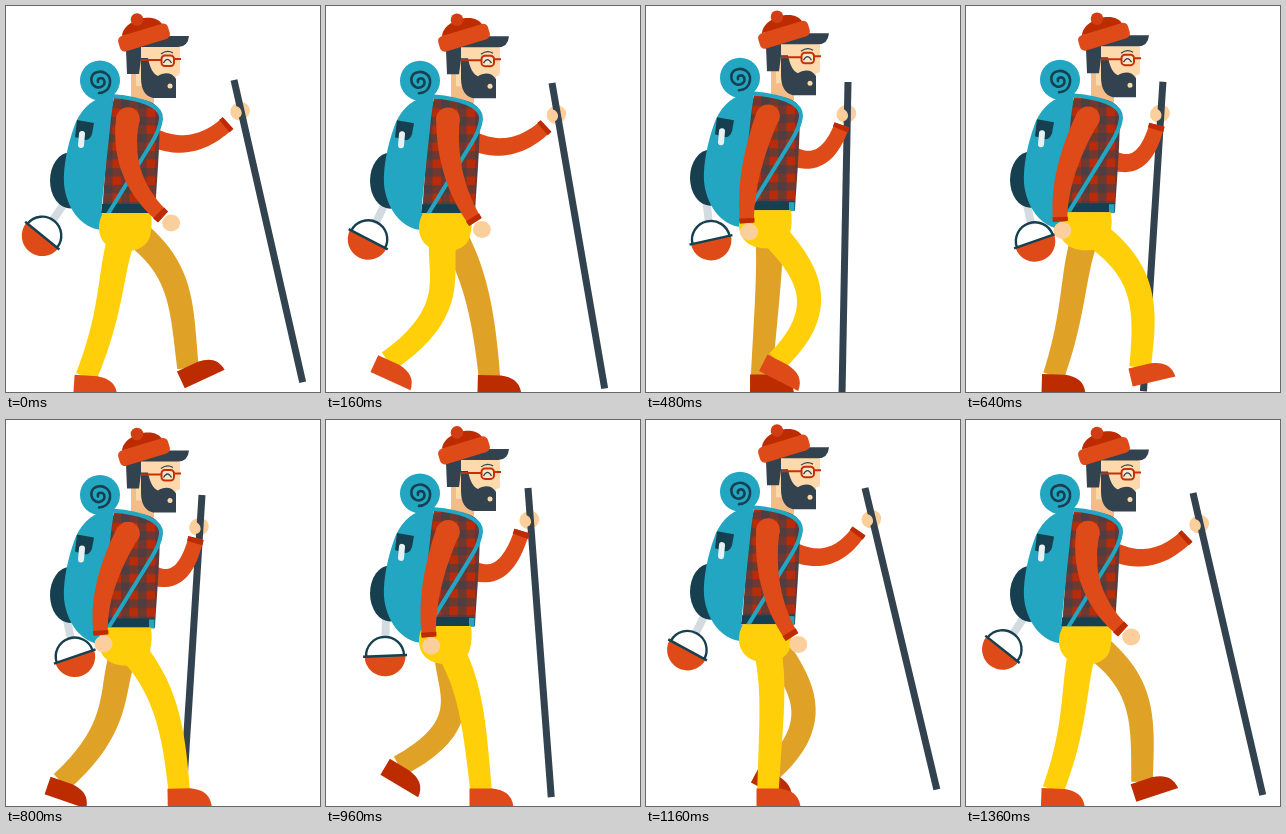
An HTML page that plays this animation: 314 px wide and 386 px high, repeating every 1400 ms.

```html
<!DOCTYPE html>
<html lang="en">
<head>
<meta charset="utf-8">
<title>Walking hiker</title>
<style>
html, body { margin: 0; width: 100%; height: 100%; overflow: hidden; background: #fff; }
svg { display: block; width: 100vw; height: 100vh; }
</style>
</head>
<body>
<svg viewBox="0 0 314 386" fill="none">
  <defs>
    <pattern id="plaid" x="98" y="94" width="17" height="17" patternUnits="userSpaceOnUse">
      <rect width="17" height="17" fill="#b92c0a"/>
      <path d="M0 0H8.500V17H0ZM0 0H17V8.500H0Z" fill="#33424f" fill-opacity=".0"/>
      <rect width="8.500" height="17" fill="#33424f" fill-opacity=".55"/>
      <rect width="17" height="8.500" fill="#33424f" fill-opacity=".55"/>
    </pattern>
  </defs>

  <ellipse id="palm" rx="10" ry="9" fill="#fbcf9b"/>
  <path id="pole" d="M0 0V310" stroke="#33424f" stroke-width="7"/>
  <ellipse id="fingers" rx="5" ry="6" fill="#fbcf9b"/>
  <path id="farArm" fill="#de4b19"/>
  <path id="farCuff" fill="#bd2b00"/>

  <path id="farLeg" fill="#e0a226"/>
  <path id="farShoe" class="shoe" fill="#bd2b00"/>

  <g class="bob">
    <path id="tether" d="M0 0V25" stroke="#d3dbe0" stroke-width="8"/>
    <g id="pot">
      <path d="M-20.500 0H20.500A20.500 20.500 0 0 1-20.500 0Z" fill="#de4b19"/>
      <path d="M-22 0H22M-19 0A19 19 0 0 1 19 0" stroke="#16404f" stroke-width="2.400"/>
    </g>
    <ellipse cx="64" cy="174.500" rx="20" ry="28" fill="#16404f"/>
    <path d="M125 66H148V97H125Z" fill="#f5bc88"/>
    <path d="M108 92C125 92 146 92 152 102C156 112 152 160 149 207H96L103 112Z" fill="url(#plaid)"/>
    <path d="M96 198H149V207H95Z" fill="#16404f"/>
    <path d="M143 199H148.500V208H143Z" fill="#23a6c1"/>
    <path d="M108 90L98 91C84 94 73 106 68 121C62 138 57 160 58 178C60 200 74 223 97 224L104 211L95 207L105 112Z" fill="#23a6c1"/>
    <circle cx="94" cy="74.500" r="20" fill="#23a6c1"/>
    <path d="M92 76C91 72 96 71 98 74C100 79 95 83 90 81C84 78 84 70 89 67C97 63 105 69 104 77C103 84 98 87 93 87" stroke="#16404f" stroke-width="2.600" stroke-linecap="round"/>
    <path d="M71 114L88 117L86 128Q84 134 79 134L69 131Z" fill="#16404f"/>
    <path d="M76 128L75 139" stroke="#e8f0f3" stroke-width="6" stroke-linecap="round"/>
    <path d="M106 90C130 92 156 98 155 113C154 122 150 130 145 138L102 208" stroke="#23a6c1" stroke-width="4"/>
  </g>

  <path id="nearLeg" fill="#ffd00a"/>
  <path id="nearShoe" class="shoe" fill="#de4b19"/>
  <path class="bob" d="M97 207H145C146 215 146 222 144 230C142 240 130 246 119 245C104 245 93 236 93 222C93 215 95 211 97 207Z" fill="#ffd00a"/>

  <ellipse id="nearHand" rx="9" ry="8.500" fill="#fbcf9b"/>
  <circle class="bob" cx="122" cy="113" r="11.800" fill="#de4b19"/>
  <path id="nearArm" fill="#de4b19"/>
  <path id="nearCuff" fill="#bd2b00"/>

  <g class="bob">
    <path d="M130 38H174V67Q174 70 170 70V80H130Z" fill="#fdd9ac"/>
    <path d="M120 44L160 30H183Q182 41 172 41H135V53L133 68H121Z" fill="#33424f"/>
    <path d="M135 52H142C144 62 147 68 152 70C158 66 166 66 170 73V92H147Q135 89 135 72Z" fill="#33424f"/>
    <circle cx="164" cy="80" r="2.500" fill="#fdd9ac"/>
    <path d="M155 48Q161 43.500 167 47" stroke="#33424f" stroke-width="1.200"/>
    <path d="M135 54H155M168 53H175" stroke="#c5300a" stroke-width="2"/>
    <rect x="155.500" y="49.500" width="12.500" height="10.500" rx="3.500" fill="#fde6c8" stroke="#c5300a" stroke-width="2"/>
    <path d="M157.500 57Q161.500 50 165.500 57" stroke="#33424f" stroke-width="1.300"/>
    <path d="M116 30C117 14 150 4 157 20Z" fill="#bd2b00"/>
    <circle cx="131" cy="13.500" r="6.300" fill="#d23d12"/>
    <rect x="112" y="23.500" width="52" height="16" rx="5" fill="#de4b19" transform="rotate(-17 138 31.500)"/>
  </g>
</svg>
<script>
const LOOP = 1400, STEP = 40;
const $ = id => document.getElementById(id);
const bobbing = document.querySelectorAll('.bob');

// time, ankle x, ankle y, shoe angle, upper control x, lower control x
const gait = [
  [0, 80, 371, 4, 103, 109],
  [100, 58, 362, 19, 103, 127],
  [260, 76, 346, 31, 118, 162],
  [320, 79, 351, 30, 127, 160],
  [460, 126, 353, 28, 157, 185],
  [480, 131, 355, 27, 161, 187],
  [660, 179, 362, -18, 183, 180],
  [700, 185, 362, -25, 181, 178],
  [800, 173, 370, -1, 156, 167],
  [960, 155, 370, 0, 144, 148],
  [1020, 145, 370, 0, 144, 142],
  [1160, 122, 370, 0, 130, 125],
  [1360, 87, 370, 2, 106, 113]
];

// time, pole x, y, angle, near wrist x, y, elbow x, pot swing, far shoulder y
const upper = [
  [0, 228, 74, 12.8, 157, 211, 112, 34.4, 131],
  [320, 221, 79, 6, 137, 220, 122, 13.4, 139],
  [480, 202, 76, -1.1, 101, 217, 98, -6.8, 150],
  [800, 196, 75, -3.6, 95, 215, 90, -12, 155],
  [960, 202, 68, 4.3, 103, 217, 99, 1.3, 150],
  [1160, 219, 68, 13.4, 146, 217, 116, 26, 131],
  [1360, 227, 73, 13, 157, 211, 112, 34, 131]
];

// Smooth cyclic interpolation through the rows of a key table
function pose(keys, time) {
  const n = keys.length, t = time % LOOP;
  let i = n - 1;
  while (keys[i][0] > t) i--;
  const row = k => keys[(k + n) % n];
  const at = k => row(k)[0] + Math.floor(k / n) * LOOP;
  const [ta, tb, tc, td] = [at(i - 1), at(i), at(i + 1), at(i + 2)];
  const h = tc - tb, u = (t - tb) / h, u2 = u * u, u3 = u2 * u;
  return row(i).slice(1).map((b, j) => {
    const a = row(i - 1)[j + 1], c = row(i + 1)[j + 1], d = row(i + 2)[j + 1];
    const m = (c - a) / (tc - ta) * h, k = (d - b) / (td - tb) * h;
    return (2 * u3 - 3 * u2 + 1) * b + (u3 - 2 * u2 + u) * m +
      (3 * u2 - 2 * u3) * c + (u3 - u2) * k;
  });
}

function bezier(pts, t) {
  let p = pts;
  while (p.length > 2)
    p = p.slice(1).map((q, i) => [p[i][0] + (q[0] - p[i][0]) * t, p[i][1] + (q[1] - p[i][1]) * t]);
  const [[ax, ay], [bx, by]] = p, len = Math.hypot(bx - ax, by - ay) || 1;
  return { x: ax + (bx - ax) * t, y: ay + (by - ay) * t, dx: (bx - ax) / len, dy: (by - ay) / len };
}

// Tapered outline along a Bezier curve
function limb(pts, w0, w1, from = 0, to = 1) {
  const left = [], right = [], n = 22;
  for (let i = 0; i <= n; i++) {
    const t = from + (to - from) * i / n, p = bezier(pts, t), r = (w0 + (w1 - w0) * t) / 2;
    left.push((p.x + p.dy * r).toFixed(2) + ' ' + (p.y - p.dx * r).toFixed(2));
    right.unshift((p.x - p.dy * r).toFixed(2) + ' ' + (p.y + p.dx * r).toFixed(2));
  }
  return 'M' + left.concat(right).join('L') + 'Z';
}

function place(el, x, y, angle = 0) {
  el.setAttribute('transform', `translate(${x.toFixed(2)} ${y.toFixed(2)}) rotate(${angle.toFixed(2)})`);
}

function drawLeg(name, time, bob, hipShift, shift) {
  const [x, y, angle, c1, c2] = pose(gait, time);
  const pts = [[119 + hipShift, 222 + bob], [c1 + shift, 262], [c2 + shift, 300], [x + shift, y]];
  $(name + 'Leg').setAttribute('d', limb(pts, 28, 21.5));
  place($(name + 'Shoe'), x + shift, y, angle);
}

function drawArm(name, pts, w0, w1) {
  $(name + 'Arm').setAttribute('d', limb(pts, w0, w1));
  $(name + 'Cuff').setAttribute('d', limb(pts, w0 + 1, w1 + 1, 0.95, 1));
}

function draw(t) {
  const bob = 1.7 * (Math.cos(2 * Math.PI * (t - 90) / 700) - 1) + 0.5;
  const [px, py, pa, wx, wy, ex, swing, sy] = pose(upper, t);
  bobbing.forEach(el => place(el, 0, bob));

  drawLeg('far', t + LOOP / 2, bob, 4, -3);
  drawLeg('near', t, bob, 0, 0);

  const rad = Math.PI / 180, drop = sy - 131;
  const gx = px - 32 * Math.sin(-pa * rad), gy = py + 32 * Math.cos(pa * rad);
  place($('pole'), px, py, -pa);
  place($('palm'), gx - 1, gy, -20);
  place($('fingers'), gx - 4.5, gy + 1, -20);
  drawArm('far', [[146, sy], [186 - drop * 0.35, 150 + drop * 0.8], [px - 6, py + 43]], 19, 15);

  const arm = [[122, 112 + bob], [ex, 170], [wx, wy]], end = bezier(arm, 1);
  drawArm('near', arm, 23.5, 14);
  place($('nearHand'), wx + end.dx * 9 + 1.5, wy + end.dy * 9);

  place($('tether'), 60, 195, swing);
  place($('pot'), 60 - 42 * Math.sin(swing * rad), 195 + 42 * Math.cos(swing * rad), swing * 1.25 - 4);
}

document.querySelectorAll('.shoe').forEach(el =>
  el.setAttribute('d', 'M-11.500-1.500H11.500C24 0 31 5 32.500 17H-11.500Z'));

const start = performance.now();
function tick() {
  const t = (performance.now() - start) % LOOP;
  draw(Math.floor(t / STEP) * STEP);
  requestAnimationFrame(tick);
}
tick();
</script>
</body>
</html>
```
